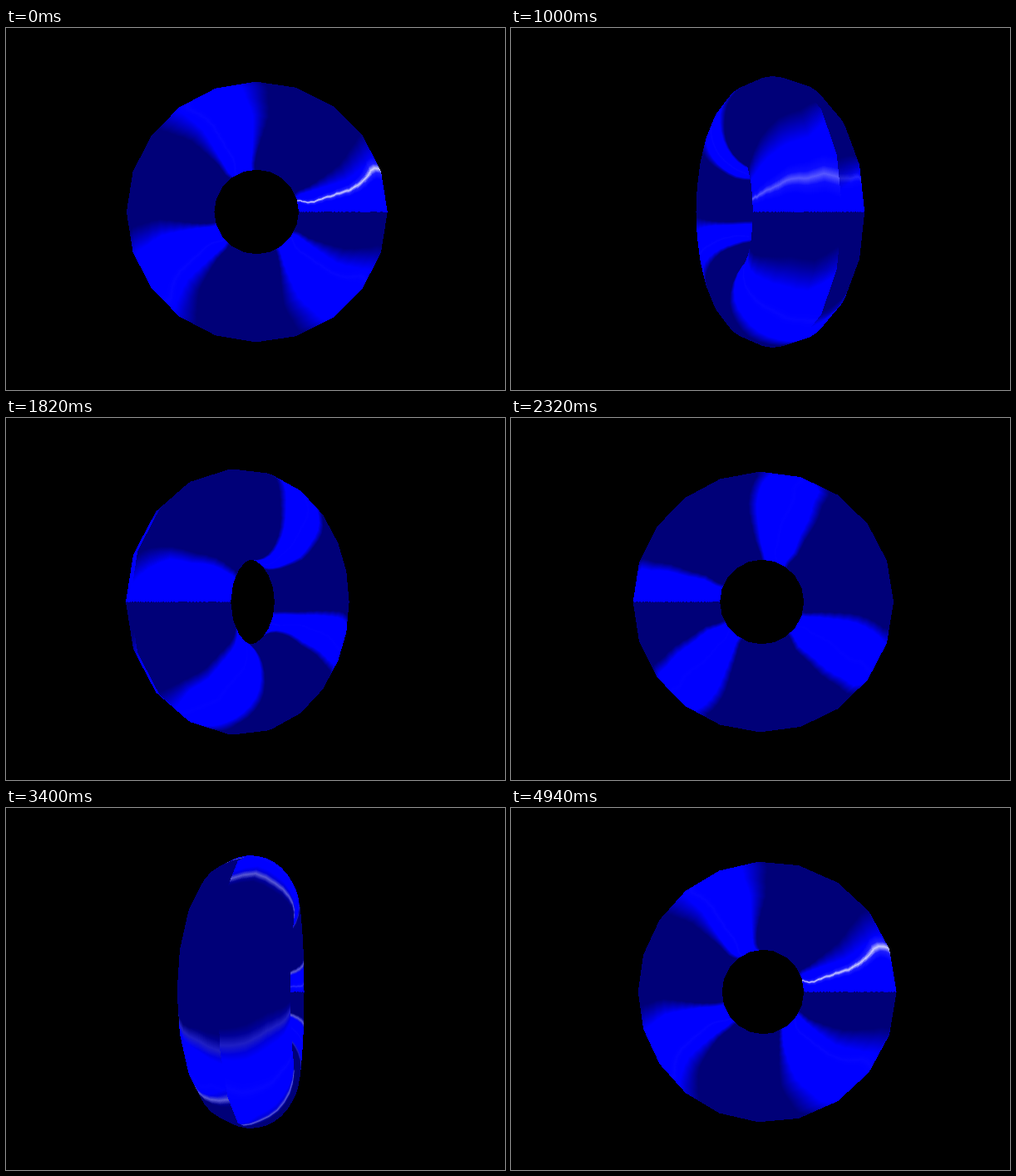
Write an HTML page with a canvas that moves like this. It is 600x436 px and loops after 5800 ms.

```html
<!DOCTYPE html>
<html lang="en">
<head>
<meta charset="utf-8">
<title>Rotating torus</title>
<style>
html, body { margin: 0; width: 100%; height: 100%; overflow: hidden; background: #000; }
canvas { display: block; }
</style>
</head>
<body>
<canvas id="stage" width="600" height="436"></canvas>
<script>
const W = 600, H = 436, LOOP = 5800, TURN = 2 * Math.PI;
const CENTER_X = 300.8, CENTER_Y = 221.5, CAMERA = 418.7;
const RING = 102.3, TUBE = 51.2, RING_STEPS = 20, TUBE_STEPS = 32;
const PERIOD = 360 / 3.5; // the texture repeats 3.5 times around the ring
const SPIN_START = 282, SPIN_END = 4390, DEGREES_PER_MS = .0902;
const STRIKE_START = 4940, STRIKE_LENGTH = LOOP / 5;

const ctx = document.getElementById('stage').getContext('2d');
const image = ctx.createImageData(W, H);
const pixels = new Uint32Array(image.data.buffer);
const depth = new Float32Array(W * H);

const clamp = x => Math.max(0, Math.min(1, x));
const ridge = (distance, width) => Math.max(0, 1 - Math.abs(distance) / width);

// Seeded zigzag between -1 and 1 with straight pieces
function zigzag(v, seed, pieces = 16) {
  const knot = n => { const s = Math.sin(n * 12.99 + seed * 78.23) * 43758.5; return 2 * (s - Math.floor(s)) - 1; };
  const n = Math.floor(v * pieces), k = v * pieces - n;
  return knot(n) * (1 - k) + knot(n + 1) * k;
}

// Profiles along the tube, in degrees: v = 0 outer rim, .25 front, .5 inner rim, .75 back
const profile = rule => Float32Array.from({ length: 257 }, (_, i) => rule(i / 256));
const bandStart = profile(v => -12 + 3 * Math.cos(2 * TURN * v) + 1.5 * zigzag(v, 1));
const bandEnd = profile(v => 35 - 23 * v - 4 * Math.sin(TURN * v) + 1.5 * zigzag(v, 2));
const softness = profile(v => 5 + 7 * Math.max(0, Math.sin(TURN * v + .8)));

// The pose stutters twice before the steady spin
function spinAngle(t) {
  const time = t < 280 ? 299 : t < 440 ? 380 : Math.min(t, SPIN_END);
  return (SPIN_START - time) * DEGREES_PER_MS / 360 * TURN;
}

function lighting(t, angle) {
  const first = .8 * Math.max(0, Math.cos(angle));
  const strike = Math.floor((t - STRIKE_START + LOOP) % LOOP / STRIKE_LENGTH);
  return {
    first,
    others: .02 + .3 * ridge(t - 4020, 350),
    glow: .4 * ridge(t - 3300, 700),
    bolt: profile(v => {
      const fromRim = Math.min(v, 1 - v);
      return 5 + 7 * first + 11 * first * clamp((.3 - fromRim) / .15)
        + 5 * clamp((fromRim - .4) * 10) + 1.5 * zigzag(v, 3 + strike, 24);
    })
  };
}

function shade(u, v, light) {
  const row = Math.round(clamp(v) * 256);
  const repeat = Math.floor((u + PERIOD * .4) / PERIOD);
  const local = u - repeat * PERIOD;
  const fromStart = local - bandStart[row], toEnd = bandEnd[row] - local;
  const band = clamp(.5 + fromStart / softness[row]) * clamp(.5 + toEnd / softness[row]);
  const strength = (repeat ? light.others : light.first) * (v < .5 ? 1 : .4);
  const offset = local - light.bolt[row], width = 1.7 + 1.6 * clamp(1 - 4 * v);
  const flash = strength * Math.max(ridge(offset, width), .25 * ridge(offset, 2 * width));
  const glow = Math.max(light.glow * ridge(toEnd, 3), Math.min(light.glow, .12) * ridge(fromStart, 3));
  const white = Math.max(flash, glow);
  const base = 120 + 135 * band;
  const gray = Math.round(255 * white), blue = Math.round(base + (255 - base) * white);
  return 0xff000000 | blue << 16 | gray << 8 | gray;
}

function project(i, j, cos, sin) {
  const around = i / RING_STEPS * TURN, across = j / TUBE_STEPS * TURN;
  const radius = RING + TUBE * Math.cos(across);
  const x = radius * Math.cos(around), z = TUBE * Math.sin(across);
  const w = 1 / (CAMERA + x * sin - z * cos);
  return {
    x: CENTER_X + CAMERA * (x * cos + z * sin) * w,
    y: CENTER_Y - CAMERA * radius * Math.sin(around) * w,
    w, u: i / RING_STEPS * 360 * w, v: j / TUBE_STEPS * w
  };
}

function fillTriangle(a, b, c, light) {
  const area = (b.x - a.x) * (c.y - a.y) - (b.y - a.y) * (c.x - a.x);
  if (Math.abs(area) < 1e-6) return;
  const left = Math.floor(Math.min(a.x, b.x, c.x)), right = Math.ceil(Math.max(a.x, b.x, c.x));
  const top = Math.floor(Math.min(a.y, b.y, c.y)), bottom = Math.ceil(Math.max(a.y, b.y, c.y));
  for (let y = top; y < bottom; y++) {
    for (let x = left; x < right; x++) {
      const px = x + .5, py = y + .5;
      const kb = ((px - a.x) * (c.y - a.y) - (py - a.y) * (c.x - a.x)) / area;
      const kc = ((b.x - a.x) * (py - a.y) - (b.y - a.y) * (px - a.x)) / area;
      const ka = 1 - kb - kc;
      if (ka < -1e-6 || kb < -1e-6 || kc < -1e-6) continue;
      const w = ka * a.w + kb * b.w + kc * c.w, index = y * W + x;
      if (w <= depth[index]) continue;
      depth[index] = w;
      pixels[index] = shade((ka * a.u + kb * b.u + kc * c.u) / w,
        (ka * a.v + kb * b.v + kc * c.v) / w, light);
    }
  }
}

function draw(t) {
  const angle = spinAngle(t), light = lighting(t, angle);
  const cos = Math.cos(angle), sin = Math.sin(angle);
  pixels.fill(0xff000000);
  depth.fill(0);
  const grid = Array.from({ length: RING_STEPS + 1 }, (_, i) =>
    Array.from({ length: TUBE_STEPS + 1 }, (_, j) => project(i, j, cos, sin)));
  for (let i = 0; i < RING_STEPS; i++) {
    for (let j = 0; j < TUBE_STEPS; j++) {
      const a = grid[i][j], b = grid[i + 1][j], c = grid[i + 1][j + 1], d = grid[i][j + 1];
      fillTriangle(a, b, d, light);
      fillTriangle(b, c, d, light);
    }
  }
  ctx.putImageData(image, 0, 0);
}

const startTime = performance.now();
let shown = -1;
function frame() {
  const t = Math.floor((performance.now() - startTime) % LOOP / 20) * 20;
  if (t !== shown) draw(shown = t);
  requestAnimationFrame(frame);
}
frame();
</script>
</body>
</html>
```
